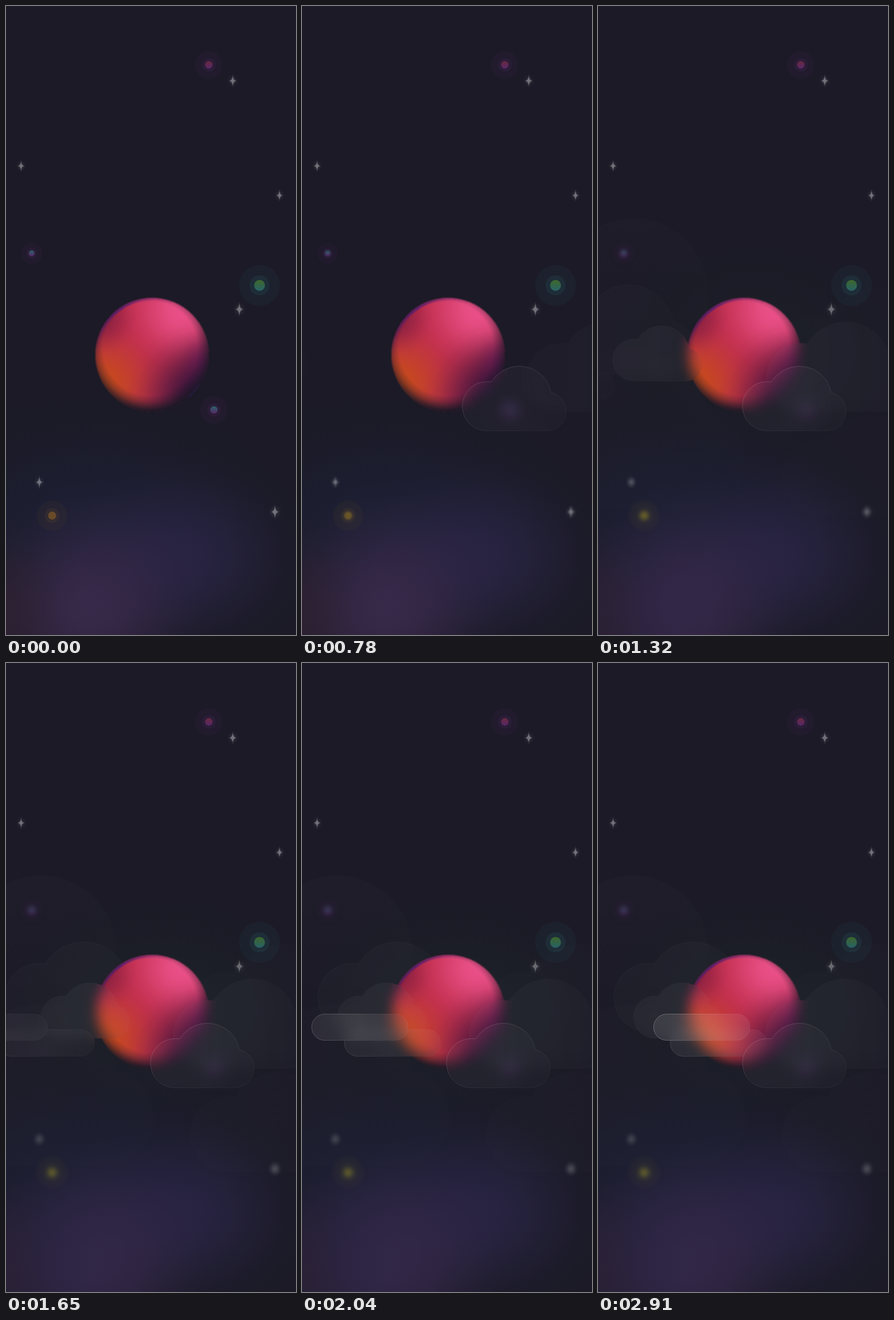
An HTML page with a canvas that plays this animation: 509 px wide and 1101 px high, repeating every 2970 ms.

```html
<!DOCTYPE html>
<html lang="en">
<head>
<meta charset="utf-8">
<title>Night sky with clouds</title>
<style>
html, body { margin: 0; height: 100%; overflow: hidden; background: #1b1a26; }
canvas { display: block; width: 100vw; height: 100vh; }
</style>
</head>
<body>
<canvas id="stage" width="509" height="1101"></canvas>
<script>
const W = 509, H = 1101, LOOP = 2970, STEP = 30, BLUR = 10, TAU = Math.PI * 2;
const stage = document.getElementById('stage');
const ctx = stage.getContext('2d');

const clamp = v => Math.max(0, Math.min(1, v));
const white = a => `rgba(255,255,255,${a})`;
const rad = deg => deg * Math.PI / 180;

function layer(paint) {
  const c = document.createElement('canvas');
  c.width = W;
  c.height = H;
  paint(c.getContext('2d'));
  return c;
}

function disc(g, x, y, r, fill) {
  g.fillStyle = fill;
  g.beginPath();
  g.arc(x, y, r, 0, TAU);
  g.fill();
}

// Soft elliptical spot with a cosine falloff
function glow(g, x, y, rx, ry, rgb, a) {
  g.save();
  g.translate(x, y);
  g.scale(rx, ry);
  const grad = g.createRadialGradient(0, 0, 0, 0, 0, 1);
  for (let p = 0; p <= 1; p += .125) {
    grad.addColorStop(p, `rgba(${rgb},${a * (1 + Math.cos(p * Math.PI)) / 2})`);
  }
  disc(g, 0, 0, 1, grad);
  g.restore();
}

function blend(g, x0, y0, x1, y1, colors) {
  const grad = g.createLinearGradient(x0, y0, x1, y1);
  colors.forEach((c, i) => grad.addColorStop(i / (colors.length - 1), c));
  return grad;
}

function planet(g, x, y, r, topHue, bottomHue) {
  const tone = (hue, a) => `hsla(${hue},45%,29%,${a})`;
  disc(g, x, y, r * 3.8, tone(bottomHue, .09));
  disc(g, x, y, r * 1.85, tone(bottomHue, .18));
  disc(g, x, y, r, blend(g, x, y - r, x, y + r, [tone(topHue, .95), tone(bottomHue, .95)]));
}

function sparkle(g, x, y, h) {
  const w = h * .55, a = .32;
  glow(g, x, y, w * 1.6, h, '255,255,255', a * .3);
  g.fillStyle = white(a);
  g.beginPath();
  g.moveTo(x, y - h);
  g.quadraticCurveTo(x, y, x + w, y);
  g.quadraticCurveTo(x, y, x, y + h);
  g.quadraticCurveTo(x, y, x - w, y);
  g.quadraticCurveTo(x, y, x, y - h);
  g.fill();
}

const sky = layer(g => {
  g.fillStyle = '#1b1a26';
  g.fillRect(0, 0, W, H);
  glow(g, 150, 900, 370, 230, '29,34,60', .55);
  glow(g, 310, 965, 240, 190, '41,36,68', .9);
  glow(g, 145, 1055, 230, 230, '60,43,78', .85);
  glow(g, 0, 1060, 110, 170, '52,35,50', .5);
  planet(g, 356, 103, 6.5, 340, 285);
  planet(g, 445, 489, 9.5, 100, 185);
  planet(g, 365, 707, 6.5, 185, 285);
  sparkle(g, 398, 131, 12);
  sparkle(g, 26.5, 280, 11);
  sparkle(g, 480, 331.5, 11);
  sparkle(g, 409.5, 531, 14);
});

const orb = layer(g => {
  const x = 256.5, y = 610.5, r = 99.5;
  const body = layer(b => {
    b.beginPath();
    b.arc(x, y, r, 0, TAU);
    b.clip();
    b.fillStyle = '#c02e4c';
    b.fillRect(0, 0, W, H);
    glow(b, 165, 662, 120, 115, '198,74,28', 1);
    glow(b, 312, 532, 120, 115, '234,80,136', 1);
    glow(b, 162, 545, 75, 75, '110,26,60', .7);
    glow(b, 350, 688, 142, 140, '36,16,56', 1);
    glow(b, 358, 625, 60, 70, '80,20,88', .5);
    const shade = b.createRadialGradient(253, 599, 83, 253, 599, 110);
    shade.addColorStop(0, 'rgba(27,25,37,0)');
    shade.addColorStop(.4, 'rgba(27,25,37,.3)');
    shade.addColorStop(1, 'rgba(27,25,37,1)');
    b.fillStyle = shade;
    b.fillRect(0, 0, W, H);
  });
  g.filter = 'blur(1.3px)';
  g.drawImage(body, 0, 0);
  // Violet rim light on the upper left, a thinner one opposite
  const rim = (from, to, width) => {
    g.lineWidth = width;
    g.beginPath();
    g.arc(x, y, r - 2, rad(from), rad(to));
    g.stroke();
  };
  g.strokeStyle = blend(g, x - r, y, x + r / 3, y - r, ['#3c1c8200', '#3c1c82cc', '#3c1c8200']);
  rim(180, 290, 3.5);
  g.strokeStyle = '#3a248080';
  rim(32, 50, 1.5);
});

function cloudPath(x, y, s) {
  const p = new Path2D();
  const lobe = (cx, cy, r, from, to) =>
    p.arc(x + cx * s, y + cy * s, r * s, rad(from), rad(to));
  lobe(43, 70, 43, 90, 270);
  lobe(100, 57, 57, 211.7, 348.9);
  lobe(148, 79, 34, -76.4, 90);
  p.closePath();
  return p;
}

// Frosted pane: backdrop blur, soft horizontal tint, lit upper edge
function pane(path, x, y, w, h, { blur = BLUR, tint, edge, opacity = 1 }) {
  if (x >= W || x + w <= 0) return;
  ctx.save();
  ctx.save();
  ctx.clip(path);
  if (blur) {
    const m = blur * 3;
    const sx = Math.max(0, Math.floor(x - m)), sy = Math.max(0, Math.floor(y - m));
    const sw = Math.min(W, Math.ceil(x + w + m)) - sx;
    const sh = Math.min(H, Math.ceil(y + h + m)) - sy;
    ctx.filter = `blur(${blur}px)`;
    ctx.drawImage(stage, sx, sy, sw, sh, sx, sy, sw, sh);
    ctx.filter = 'none';
  }
  ctx.globalAlpha = opacity;
  ctx.fillStyle = blend(ctx, x, 0, x + w, 0, [.75, 1, .5].map(k => white(tint * k)));
  ctx.fillRect(x, y, w, h);
  ctx.restore();
  ctx.globalAlpha = opacity;
  ctx.strokeStyle = blend(ctx, x + w * .3, y, x + w * .7, y + h, [1, .6, .3].map(k => white(edge * k)));
  ctx.stroke(path);
  ctx.restore();
}

function cloud(x, y, s, look) {
  pane(cloudPath(x, y, s), x, y, 182 * s, 113 * s, look);
}

function pill(x, y, h, look) {
  const p = new Path2D();
  p.roundRect(x, y, 169, h, h / 2);
  pane(p, x, y, 169, h, look);
}

// Distance still to travel before coming to rest at time end
const glide = (t, end) => (Math.max(0, end - t) * .0155) ** 2;
const drift = (t, end) => (Math.max(0, end - t) * .00373) ** 3;
const arrival = gap => clamp(1 - gap / 350);

// Slides a shape in from one side, growing clearer as it settles
function enter(shape, gap, side, x, y, size, look) {
  shape(x + side * gap, y, size, { ...look, opacity: arrival(gap) });
}

function draw(t) {
  const haze = clamp((t - 300) / 1350);
  const fade = clamp((t - 750) / 900);

  ctx.drawImage(sky, 0, 0);

  if (haze) ctx.filter = `blur(${haze * 4}px)`;
  planet(ctx, 45, 433, 5, 185, 285);
  planet(ctx, 81, 892, 7, 32 + 26 * haze, 32 + 26 * haze);
  sparkle(ctx, 58.5, 833.5, 12);
  sparkle(ctx, 472, 885.5, 14);
  ctx.filter = 'none';

  if (fade) {
    glow(ctx, 275, 605, 290, 215, '30,48,44', .32 * fade);
    glow(ctx, 90, 1050, 250, 220, '36,34,66', .4 * fade);
    disc(ctx, 62, 504, 132, blend(ctx, 0, 372, 0, 600, [white(.016 * fade), white(0)]));
    const far = { blur: 0, tint: .009, edge: 0, opacity: fade };
    cloud(-195, 598, 2.5, far);
    cloud(315, 492, 1.75, far);
    cloud(323, 716, 1.55, far);
  }

  enter(cloud, glide(t, 2005), -1, 28, 488.5, 1.39, { blur: 0, tint: .02, edge: .04 });
  ctx.drawImage(orb, 0, 0);
  enter(cloud, glide(t, 1430), 1, 293, 553, 1.39, { tint: .024, edge: .01 });
  enter(cloud, glide(t, 1710), -1, 62, 559.5, .863, { tint: .04, edge: .02 });
  enter(pill, drift(t, 3045), -1, 127, 641.5, 47, { tint: .08, edge: .14 });
  enter(cloud, glide(t, 1120), 1, 253.5, 630.5, 1, { tint: .03, edge: .16 });
  enter(pill, drift(t, 3205), -1, 99, 614.5, 46, { tint: .12, edge: .27 });
}

function tick(now) {
  const t = Math.floor(now % LOOP / STEP) * STEP;
  draw(Math.min(t, LOOP - 2 * STEP));
  requestAnimationFrame(tick);
}
requestAnimationFrame(tick);
</script>
</body>
</html>
```
